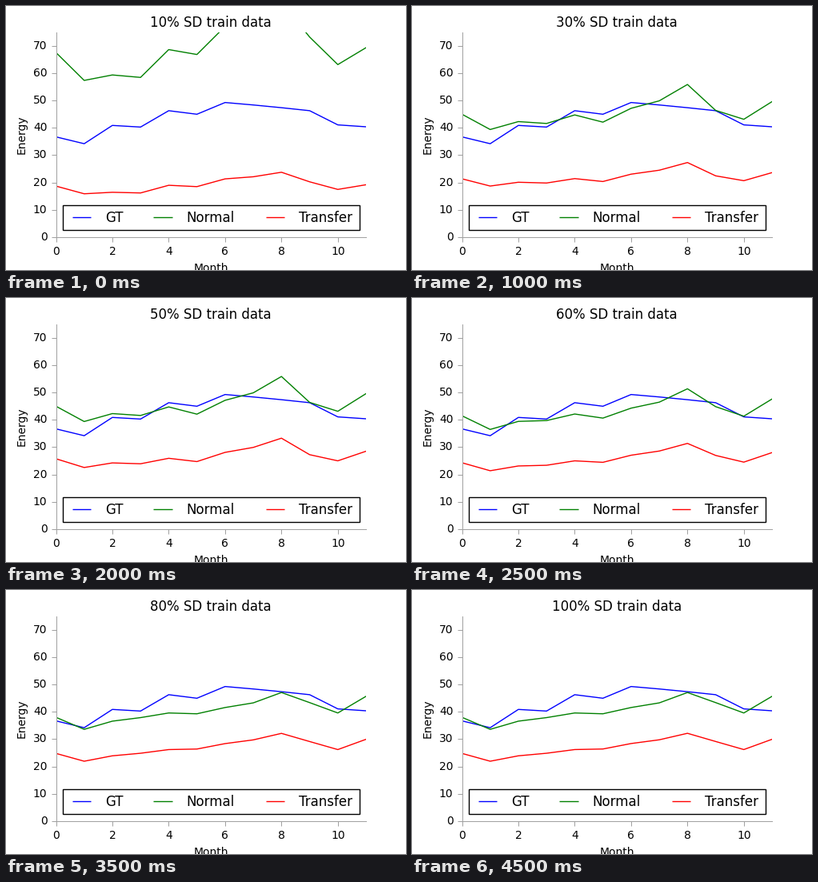
Animation, 500 px wide and 330 px high, one loop 5000 ms. Source, as a matplotlib script:

```python
import numpy as np
import matplotlib.pyplot as plt
from matplotlib.animation import FuncAnimation
from matplotlib.patches import Rectangle

W, H, DPI = 500, 330, 100
plt.rcParams["font.family"] = "DejaVu Sans"
MONTHS = np.arange(12)

# Monthly energy: the truth, then predictions at three levels of training data
TRUTH = [36.7, 34.2, 40.9, 40.3, 46.3, 45, 49.3, 48.4, 47.4, 46.3, 41.1, 40.4]
SCARCE = [67.6, 57.4, 59.4, 58.5, 68.7, 66.9, 77.2, 80, 86, 73.3, 63.2, 69.4]
PARTIAL = [45, 39.4, 42.3, 41.6, 44.7, 42, 47, 49.7, 55.7, 46.3, 43.1, 49.6]
FULL = [38, 33.6, 36.6, 37.9, 39.6, 39.3, 41.6, 43.3, 47.1, 43.4, 39.6, 45.7]


def bell(x, mid, width):
    return np.exp(-((x - mid) / width) ** 2)


SUMMER = bell(MONTHS, 7, 2.6)


def normal(share):
    """Settles from the scarce to the full profile, with a summer surge near 40%."""
    stage = np.interp(share, [10, 30, 50, 70], [0, 1, 1, 2])
    base = np.array([np.interp(stage, [0, 1, 2], levels)
                     for levels in zip(SCARCE, PARTIAL, FULL)])
    return base * (1 + 0.07 * bell(share, 40, 6) * SUMMER)


def transfer(share):
    """Follows the normal curve at a growing ratio, slightly higher in summer."""
    ratio = np.interp(share, range(10, 71, 10),
                      [0.276, 0.39, 0.474, 0.495, 0.572, 0.585, 0.652])
    lift = 0.055 * (1 - np.exp((10 - share) / 20))
    return ratio * normal(share) * (1 + lift * SUMMER)


fig = plt.figure(figsize=(W / DPI, H / DPI), dpi=DPI, facecolor="white")
ax = fig.add_axes([0.125, 0.125, 0.775, 0.775])
ax.set(xlim=(0, 11), ylim=(0, 75), xticks=range(0, 11, 2), yticks=range(0, 71, 10))
ax.spines[["top", "right"]].set_visible(False)
ax.spines[["left", "bottom"]].set(color="0.63", linewidth=0.72)
ax.tick_params(length=4, width=0.72, pad=4, color="0.63", labelsize=10)
ax.tick_params(axis="x", pad=3.8)
for label in ax.get_yticklabels():
    label.set_va("center")

# Overlay measured in pixels from the top left corner
page = fig.add_axes([0, 0, 1, 1], facecolor="none")
page.set(xlim=(0, W), ylim=(H, 0))
page.axis("off")

title = page.text(256.25, 26, "", size=12, ha="center", va="baseline")
page.text(256.25, 332.5, "Month", size=10, ha="center", va="baseline")
page.text(20, 161, "Energy", size=10, ha="center", va="center", rotation=90)

page.add_patch(Rectangle((71, 249), 371, 31, fc="white", ec="black", lw=1))
for x, name, color in ((83, "GT", "blue"), (184.3, "Normal", "green"),
                       (324.5, "Transfer", "red")):
    page.plot([x, x + 23.3], [263.8, 263.8], color=color, lw=1,
              solid_capstyle="butt")
    page.text(x + 41.2, 270, name, size=12, va="baseline")


def curve(values, color):
    return ax.plot(MONTHS, values, color=color, lw=1)[0]


curve(TRUTH, "blue")
normal_line = curve(normal(10), "green")
transfer_line = curve(transfer(10), "red")


def draw(i):
    share = 10 * (i + 1)
    title.set_text(f"{share}% SD train data")
    normal_line.set_ydata(normal(share))
    transfer_line.set_ydata(transfer(share))
    return title, normal_line, transfer_line


anim = FuncAnimation(fig, draw, frames=10, interval=500, init_func=lambda: draw(0),
                     repeat=True, repeat_delay=0, blit=False)
plt.show()
```
